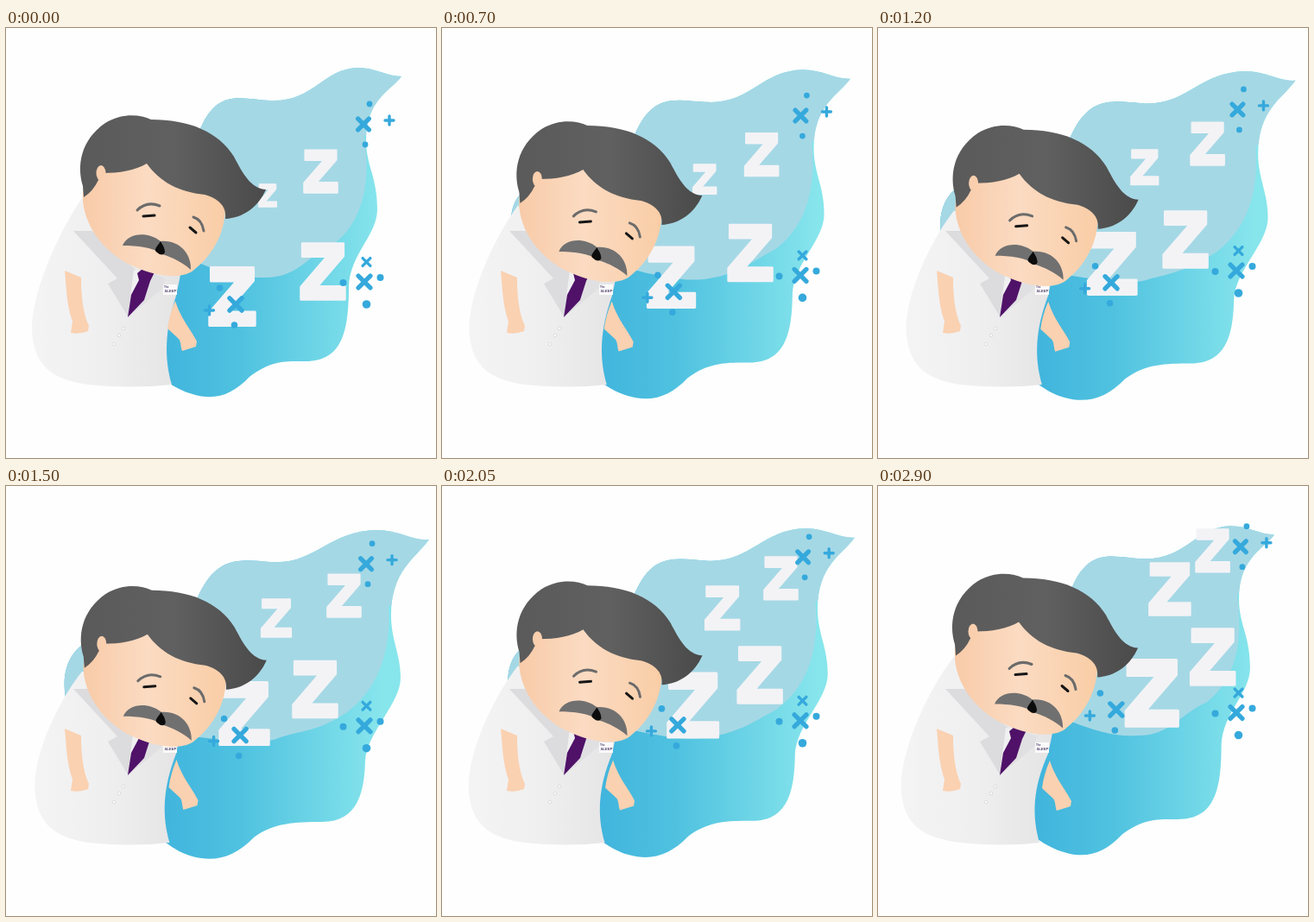
Write an HTML page that moves like this. It is 498 by 498 pixels and loops after 2950 ms.

```html
<!DOCTYPE html>
<html lang="en">
<head>
<meta charset="utf-8">
<title>Sleeping doctor</title>
<style>
html, body { margin: 0; height: 100%; overflow: hidden; background: #fdfefd; }
svg { display: block; width: 100vw; height: 100vh; }
</style>
</head>
<body>
<svg viewBox="0 0 498 498">
  <defs>
    <linearGradient id="sea" gradientUnits="userSpaceOnUse" x1="185" x2="435" y1="0" y2="0">
      <stop stop-color="#41b5dd"/><stop offset=".35" stop-color="#50c2e0"/><stop offset="1" stop-color="#87e5ec"/>
    </linearGradient>
    <linearGradient id="hairFill">
      <stop stop-color="#5a5a5a"/><stop offset=".5" stop-color="#606060"/><stop offset="1" stop-color="#4a4a4a"/>
    </linearGradient>
    <linearGradient id="skin">
      <stop stop-color="#f8cba8"/><stop offset=".45" stop-color="#fbdbc2"/><stop offset="1" stop-color="#f9cda6"/>
    </linearGradient>
    <linearGradient id="cloth">
      <stop stop-color="#f4f4f5"/><stop offset=".5" stop-color="#efeff0"/><stop offset="1" stop-color="#e4e4e5"/>
    </linearGradient>
    <clipPath id="inBlob"><path id="blobClip"/></clipPath>
  </defs>

  <path id="blob" fill="url(#sea)"/>
  <path id="haze" fill="#a5d8e5" clip-path="url(#inBlob)"/>
  <g id="letters" fill="#f3f3f6" stroke="#f3f3f6" stroke-width=".05" stroke-linejoin="round"></g>
  <g id="sparks" fill="#35a9dc" stroke="#35a9dc" stroke-linecap="round"></g>

  <path id="coat" fill="url(#cloth)"/>
  <path fill="#dcdcde" d="M78 235L100 235L156 285L141 334L118 296L129 290Z"/>
  <path fill="#e0e0e2" d="M170 284L184 290L181 302L141 335Z"/>
  <path fill="#f0f0f1" d="M148 280L172 284L141 335Z"/>
  <path fill="#4f1268" d="M152 284L158 279L172 283L167 293L160 315L141 335L145 309L154 292Z"/>
  <g fill="#fff" stroke="#d2d2d4" stroke-width=".7">
    <circle cx="136" cy="348" r="1.8"/><circle cx="131" cy="356" r="1.8"/><circle cx="125" cy="366" r="1.8"/>
  </g>
  <rect x="182" y="297" width="16" height="12" fill="#fafafa"/>
  <g fill="#4b3a68" font-family="'Liberation Sans', sans-serif" font-weight="bold">
    <text x="183" y="301" font-size="3">The</text>
    <text x="183.5" y="305.5" font-size="4.2" font-style="italic">SLEEP</text>
  </g>
  <path fill="#fad1b1" d="M68 281L87 289C87 310 89 330 96 345L95 351Q85 355 75 353L77 340C70 320 70 300 68 281Z"/>
  <path id="arm" fill="#fad1b1" d="M196 316C202 336 214 349 221 363L220 369L204 374C202 369 203 364 200 360L187 348Q189 332 196 316Z"/>

  <g id="head">
    <path fill="url(#skin)" d="M113 160C95 165 88 180 89 200C92 235 120 265 150 277C175 288 206 292 219 279C240 262 256 235 254 200L170 150Z"/>
    <path fill="url(#hairFill)" d="M89 183C82 160 86 130 115 110C135 98 155 100 168 106C212 106 246 120 264 149C275 170 284 186 301 187C292 208 274 220 254 221C256 206 245 197 230 193C200 190 178 178 163 157C150 165 130 168 113 168L107 176Q101 189 90 196Z"/>
    <ellipse cx="110" cy="168" rx="5.5" ry="9" fill="#f9cfae"/>
    <g fill="none" stroke-linecap="round">
      <path stroke="#6b6b6b" stroke-width="3" d="M152 211Q163 200 178 206M217 219Q227 222 229 235"/>
      <path stroke="#161616" stroke-width="3" d="M159 218L172 217M213 231L220 237"/>
    </g>
    <path fill="#707070" d="M135 252C141 237 164 235 179 247C200 245 215 261 214 280C204 271 193 266 181 262C170 254 152 252 135 252Z"/>
    <path fill="#0c0c0c" d="M179 247C175 253 170 257 175 260Q181 265 184 260C184 254 181 251 179 247Z"/>
  </g>
</svg>
<script>
const LOOP = 2950, TURN = 1500, STEP = 50;
const $ = id => document.getElementById(id);
const lerp = (a, b, k) => a + (b - a) * k;

// Blend two paths that share the same commands
function mix(a, b, k) {
  const ends = b.match(/\d+/g);
  let i = 0;
  return a.replace(/\d+/g, n => lerp(+n, +ends[i++], k).toFixed(2));
}

const BLOB = [
  "M458 56C447 72 417 82 417 130C417 160 430 172 430 210C430 240 398 262 397 300C397 350 390 386 347 386C325 386 308 384 282 404C262 425 242 432 216 424C205 421 196 416 185 409L150 300L92 232C88 215 92 190 110 190L200 190C215 150 222 110 240 93C258 74 285 84 306 84C357 86 366 47 408 46C428 46 441 56 458 56Z",
  "M490 62C474 84 446 98 446 150C446 178 457 195 457 222C457 252 418 285 416 318C415 354 408 389 366 389C335 389 310 390 287 407C265 430 242 436 216 429C205 426 196 421 185 413L150 300L70 250C62 215 74 182 110 175L200 190C212 150 225 115 240 101C258 82 282 86 306 88C358 92 372 52 430 51C455 51 472 64 490 62Z"
];
const HAZE = [
  "M0 0L498 0L498 90L415 125C424 190 408 228 380 250C350 262 340 289 300 289C270 290 245 282 200 262L0 262Z",
  "M0 0L498 0L498 105L443 140C446 195 430 235 395 262C360 285 345 282 315 292C300 299 262 296 200 288L0 288Z"
];

// Each Z: path through start, bend, middle, bend, end; then first and last width
const LETTERS = [
  { x: [262, 263, 276, 294, 319], y: [311, 287, 263.5, 251, 239], w: [56, 64] },
  { x: [367, 351, 358, 370, 389], y: [282, 259, 235.5, 212, 197], w: [54, 54] },
  { x: [364.5, 364, 391.5, 395, 387], y: [166, 144, 127, 101, 73], w: [41, 41] },
  { x: [303, 301, 313, 330, 338.5], y: [194, 174, 153, 139, 118], w: [22, 50.5] }
];
const Z = "M-.44-.6H.44V-.33L-.12.32H.47V.6H-.47V.33L.09-.32H-.44Z";

// Spark groups: drift over one loop, then [kind, x, y, size]
const SPARKS = [
  { dx: 6, dy: -42, parts: [["x", 414, 111.5, 9], ["+", 444, 107, 5], ["o", 421, 88, 3.4], ["o", 416, 135, 3.4]] },
  { dx: 0, dy: -32, parts: [["x", 415, 294, 9.8], ["x", 417.5, 271, 6.2], ["o", 390.5, 295, 4], ["o", 433.5, 289, 4], ["o", 417.5, 320, 4.8]] },
  { dx: 10, dy: -62, parts: [["x", 266, 320, 10], ["+", 235.5, 327, 5], ["o", 247.5, 301, 3.8], ["o", 264.5, 344, 3.8]] }
];

function sparkMarkup([kind, x, y, r]) {
  if (kind === "o") return `<circle cx="${x}" cy="${y}" r="${r}" stroke="none"/>`;
  const turn = kind === "x" ? 45 : 0;
  return `<path transform="translate(${x} ${y}) rotate(${turn})" stroke-width="${r > 7 ? 5.3 : 3.4}" d="M${-r} 0H${r}M0 ${-r}V${r}"/>`;
}

$("letters").innerHTML = LETTERS.map(() => `<path d="${Z}"/>`).join("");
$("sparks").innerHTML = SPARKS.map(g => `<g>${g.parts.map(sparkMarkup).join("")}</g>`).join("");

const bend = (a, b, c, k) => lerp(lerp(a, b, k), lerp(b, c, k), k);

function draw(now) {
  const t = Math.floor(now % LOOP / STEP) * STEP;
  const u = t / LOOP;
  const late = t >= TURN;
  const half = late ? (t - TURN) / (LOOP - TURN) : t / TURN;
  const sway = late ? 1 - half : half;

  const blob = mix(...BLOB, sway);
  $("blob").setAttribute("d", blob);
  $("blobClip").setAttribute("d", blob);
  $("haze").setAttribute("d", mix(...HAZE, sway));

  const along = v => bend(...v.slice(late ? 2 : 0, late ? 5 : 3), half);
  LETTERS.forEach((z, i) => {
    const w = lerp(...z.w, u);
    $("letters").children[i].setAttribute("transform", `translate(${along(z.x)} ${along(z.y)}) scale(${w})`);
  });
  SPARKS.forEach((g, i) =>
    $("sparks").children[i].setAttribute("transform", `translate(${g.dx * u} ${g.dy * u})`));

  const l = 5 * sway - 3.5 * u, r = -5 * u;
  $("coat").setAttribute("d",
    `M88 ${197 + 18 * sway}C${62 + l} ${235 + 8 * sway} ${32 + l} 300 ${30 + l} 345C${30 + l} 400 ${65 + l} 408 95 413` +
    `Q145 418 ${192 + r} 413C${183 + r} 382 ${184 + r} 350 197 310C200 295 205 280 200 270L100 215Z`);
  $("arm").setAttribute("transform", `translate(${3 * u} ${2 * u})`);
  $("head").setAttribute("transform", `translate(${sway * .8} ${sway * 14.8})`);
}

function tick() {
  draw(performance.now());
  requestAnimationFrame(tick);
}
tick();
</script>
</body>
</html>
```
